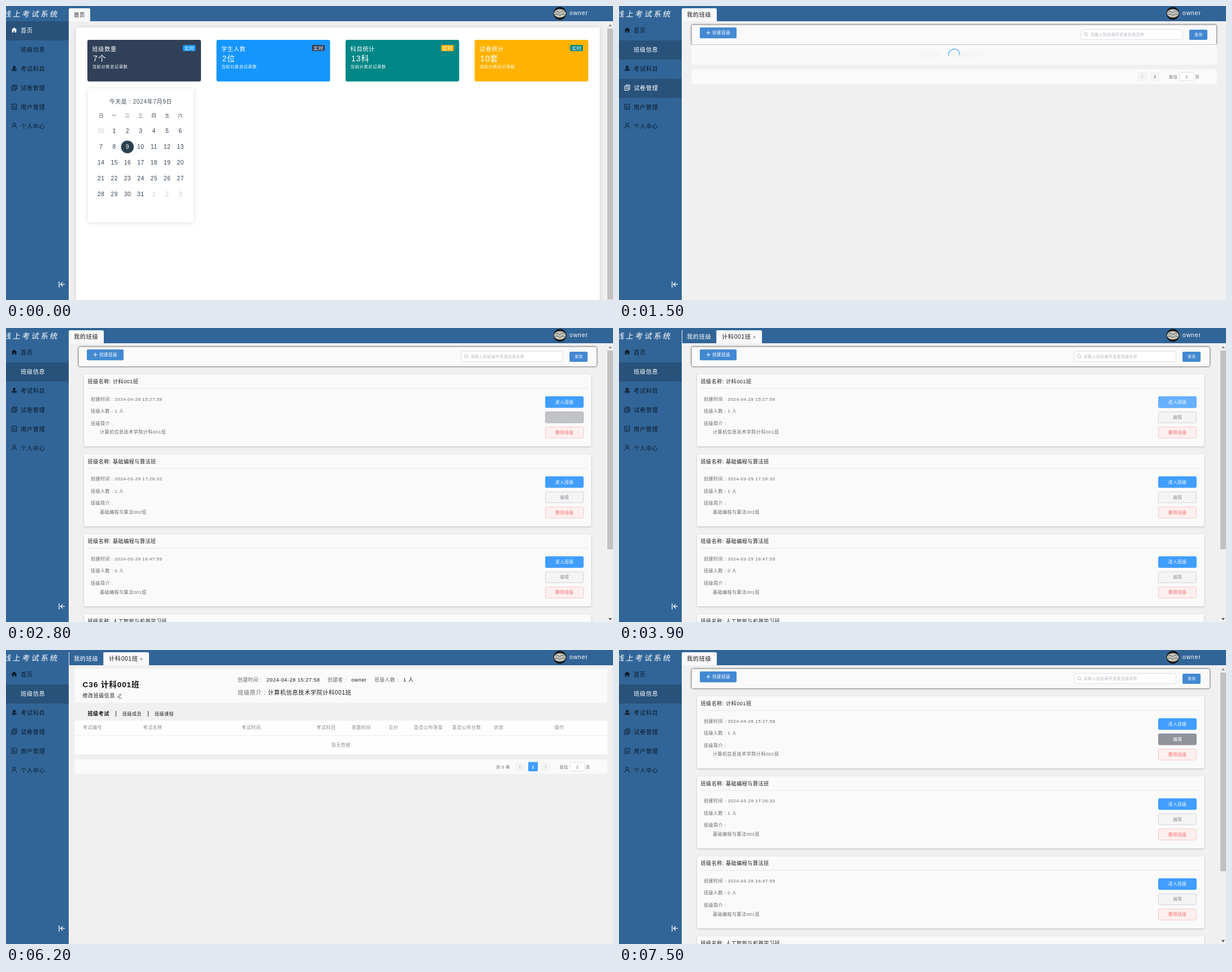
Write an HTML page that moves like this. It is 1074 px wide and 521 px high and loops after 8 s.

```html
<!DOCTYPE html>
<html lang="zh-CN">
<head>
<meta charset="utf-8">
<title>线上考试系统</title>
<style>
html, body { margin: 0; width: 100%; height: 100%; overflow: hidden; background: #f0f0f0; }
svg { display: block; width: 100vw; height: 100vh; }
text { font-family: "Liberation Sans", "Noto Sans CJK SC", "Noto Sans CJK", sans-serif; letter-spacing: .065em; white-space: pre; }
.item { color: #0b1a2a; }
.item > rect { fill: none; }
.item.on { color: #fff; }
.item.on > rect { fill: #29527b; }
.line { fill: none; stroke: currentColor; }
.bar { filter: drop-shadow(0 0 1.5px #000); }
.card { filter: drop-shadow(0 1px 1.5px rgba(0,0,0,.22)); }
.panel { filter: drop-shadow(0 1px 4px rgba(0,0,0,.13)); }
</style>
</head>
<body>
<svg id="stage" viewBox="0 0 1074 521"></svg>
<script>
const BLUE = '#409eff', BTN = '#4389d2', INK = '#1a1a1a', GREY = '#666', SIDE = '#316598';

// y is the vertical centre of the text
const text = (x, y, s, size, fill = INK, more = '') =>
  `<text x="${x}" y="${y + size * .37}" font-size="${size}" fill="${fill}" ${more}>${s}</text>`;
const mid = (x, y, s, size, fill, more = '') =>
  text(x + size * .03, y, s, size, fill, 'text-anchor="middle" ' + more);
const box = (x, y, w, h, fill, r = 0, more = '') =>
  `<rect x="${x}" y="${y}" width="${w}" height="${h}" rx="${r}" fill="${fill}" ${more}/>`;
const line = (d, color, w = 1) => `<path d="${d}" fill="none" stroke="${color}" stroke-width="${w}"/>`;
const group = (id, body, more = '') => `<g id="${id}" ${more}>${body}</g>`;
const button = (y, s, fill, color, border = fill) =>
  box(954.5, y + .5, 67, 19.5, fill, 2, `stroke="${border}"`) + mid(988, y + 10, s, 7.6, color, 'font-weight="500"');
const scrollbar = h => box(1064, 40, 10, h, '#c1c1c1') + '<path d="M1066 36h6l-3-4z" fill="#8a8a8a"/>';
const spinner = (id, y) =>
  `<circle id="${id}" cx="593" cy="${y}" r="9.8" fill="none" stroke="${BLUE}" stroke-width="1.2" stroke-dasharray="33 63" stroke-linecap="round"/>`;

function sidebar() {
  const icons = [
    '<path d="M14.5 38l-5 4.6h1.3V47h2.7v-3h2v3h2.7v-4.4h1.3z" fill="currentColor"/>',
    [0, 1, 2].map(r => [0, 1, 2].map(c => box(10 + c * 3.2, 72 + r * 3.2, 2.6, 2.6, 'currentColor')).join('')).join(''),
    '<path d="M14.5 106a2.4 2.4 0 0 1 1 4.6v1.2h3.3v2h-8.6v-2h3.3v-1.2a2.4 2.4 0 0 1 1-4.6zM10.2 114.4h8.6v.9h-8.6z" fill="currentColor"/>',
    '<path class="line" d="M12.5 142v-2h6.5v7.5h-2M10 142h6.8v7.5H10zM11.8 144.7h3.2M11.8 146.8h3.2"/>',
    '<path class="line" stroke-width=".9" d="M10.3 174h8.4v9.3h-8.4zM12.2 176.7h2M12.2 178.9h4.6M12.2 181h4.6"/>',
    '<path class="line" d="M14.5 207.4a2.6 2.6 0 1 1 0 5.2a2.6 2.6 0 1 1 0-5.2M10.3 217a4.2 4.2 0 0 1 8.4 0"/>'
  ];
  const names = ['首页', '班级信息', '考试科目', '试卷管理', '用户管理', '个人中心'];
  return box(0, 0, 111, 521, SIDE) +
    names.map((s, i) => `<g class="item">${box(0, 27 + 34 * i, 111, 34, '')}${icons[i]}${text(26, 43.3 + 33.9 * i, s, 10.2, 'currentColor')}</g>`).join('') +
    line('M94 488v11M104 493.3h-7.5M100.3 489.6l-3.8 3.7l3.8 3.7', '#fff', 1.3);
}

function header() {
  return box(0, 0, 1074, 27, SIDE) +
    text(0, 14, '线上考试系统', 13.4, '#fff', 'transform="translate(-2 0) skewX(-8)" style="letter-spacing:3px"') +
    '<circle cx="980" cy="13" r="11.4" fill="#181818"/><ellipse cx="980" cy="13" rx="10.5" ry="7.5" fill="#c6c6be"/>' +
    line('M972 11l4-2l3 3l5-3l4 2M971 15l5-1l4 3l4-3l5 1', '#555') +
    text(997, 12.6, 'owner', 10.4, '#fff', 'style="letter-spacing:.9px"');
}

const tabShape = (x, w, fill) =>
  `<path d="M${x} 27V6.500q0-2.500 2.500-2.500h${w - 5}q2.500 0 2.500 2.500V27z" fill="${fill}"/>`;

function tabs() {
  return group('homeTab', tabShape(111, 38, '#f9f9f9') + text(120, 16, '首页', 9.3)) +
    group('listTab', tabShape(111, 62, '#f9f9f9') + text(120, 15.6, '我的班级', 10.2)) +
    group('idleTab', tabShape(111, 62, '#f0f0f0') + tabShape(112, 60.5, SIDE) + text(120, 15.6, '我的班级', 10.2, '#fff')) +
    group('classTab', tabShape(172.5, 80.5, '#f9f9f9') + text(182, 15.6, '计科001班', 10.2) +
      '<circle id="closeDot" cx="239.500" cy="16.200" r="4.800" fill="#c0c4cc"/>' +
      '<path id="cross" d="M237.500 14.200l4 4m0-4l-4 4" stroke="#555" stroke-width=".9"/>');
}

function homePage() {
  const stats = [
    ['班级数量', '7个', '#304058', '#1596ff'], ['学生人数', '2位', '#1596ff', '#304058'],
    ['科目统计', '13科', '#018786', '#ffb300'], ['试卷统计', '10套', '#ffb300', '#018786']
  ];
  let s = box(124, 38, 926.5, 500, '#fff', 2, 'class="panel"');
  stats.forEach(([name, count, color, tag], i) => {
    const x = 144 + 228.4 * i;
    s += box(x, 60, 201, 73.7, color, 3) + text(x + 8.5, 76, name, 10.2, '#fff') +
      text(x + 10, 93, count, 14, '#fff') + text(x + 8.5, 107, '当前分类总记录数', 7.4, '#fff') +
      box(x + 169, 69, 22.5, 11, tag, 2) + mid(x + 180.3, 74.6, '实时', 8.3, '#fff');
  });
  s += box(145, 146, 187, 237, '#fff', 2, 'class="panel"') +
    mid(238, 169.3, '今天是 : 2024年7月9日', 10, '#46505a');
  [...'日一二三四五六'].forEach((d, i) => s += mid(168 + 23.4 * i, 194, d, 8.2, '#444'));
  s += '<circle cx="214.800" cy="249.700" r="11.300" fill="#2b4150"/>';
  for (let i = 0; i < 35; i++) {
    const day = (i + 29) % 30 + 1, inMonth = i > 0 && i < 32;
    const label = i === 0 ? 30 : i > 31 ? i - 31 : i === 31 ? 31 : day - 0;
    s += mid(168 + 23.4 * (i % 7), 221.3 + 28.1 * Math.floor(i / 7), inMonth ? i : label, 10,
      i === 9 ? '#fff' : inMonth ? '#2c3e50' : '#c8c8c8');
  }
  return s + scrollbar(480);
}

function searchBar(right) {
  const x = right - 1045;
  return box(128.5, 33.5, right - 128.5, 34.5, '#fafafa', 3, 'class="bar"') +
    box(143, 38, 65, 19.3, BTN, 2) + line('M154.5 47.300h7M158 43.800v7', '#fff') +
    text(165, 47.5, '创建班级', 7.5, '#fff', 'font-weight="500"') +
    box(805.5 + x, 41.5, 180, 18, '#fff', 2, 'stroke="#dcdfe6"') +
    `<circle cx="${814 + x}" cy="50" r="2.800" fill="none" stroke="#b4b8c0" stroke-width=".9"/>` +
    line(`M${816 + x} 52l1.500 1.500`, '#b4b8c0', .9) +
    text(822 + x, 50.5, '请输入班级编号或者班级名称', 6.9, '#b4b8c0') +
    box(997 + x, 42, 32, 18, BTN, 2) + mid(1013 + x, 51, '查询', 6.6, '#fff', 'font-weight="500"');
}

const pageButton = (x, y, dir, color) => box(x, y - 8.3, 17, 16.5, '#f4f4f5', 1) +
  line(`M${x + 8.5 - dir * 1.3} ${y - 2.8}l${dir * 2.7} 2.800l${-dir * 2.7} 2.800`, color);
const jumper = (x, y) => text(x, y + .5, '前往', 7.2, '#606266') +
  box(x + 18.5, y - 7.5, 25.5, 15, '#fff', 2, 'stroke="#dcdfe6"') +
  mid(x + 31.3, y, '1', 7.6, '#606266') + text(x + 46.5, y + .5, '页', 7.2, '#606266');

function listPage() {
  const classes = [
    ['计科001班', '2024-04-28 15:27:58', 1, '计算机信息技术学院计科001班'],
    ['基础编程与算法班', '2024-03-29 17:26:32', 1, '基础编程与算法002班'],
    ['基础编程与算法班', '2024-03-29 16:47:59', 0, '基础编程与算法001班'],
    ['人工智能与机器学习班', '', 0, '']
  ];
  const cards = classes.map(([name, time, count, about], i) =>
    `<g transform="translate(0 ${141.75 * i})">` +
    box(138, 82, 897.5, 127.7, '#fafafa', 2, 'class="card"') +
    text(144.5, 94.6, '班级名称: ' + name, 9) + line('M144.500 107h884', '#e6e6e6') +
    text(150, 125.6, '创建时间 : ' + time, 8, GREY) + text(150, 147, `班级人数 : ${count} 人`, 8, GREY) +
    text(150, 168.7, '班级简介 :', 8, GREY) + text(166, 184.5, about, 8, GREY) +
    button(121, '进入班级', BLUE, '#fff') + button(148, '编辑', '#f4f4f5', '#909399', '#d3d4d6') +
    button(175, '删除班级', '#fef0f0', '#f56c6c', '#fbc4c4') + '</g>').join('');
  const empty = searchBar(1057) + box(128.5, 68.5, 929, 35.5, '#f9f9f9') +
    mid(593, 86, '暂无班级，快去创建班级吧~~', 9, '#eee') + spinner('listSpin', 86) +
    box(128.5, 112, 929, 26, '#fafafa') + pageButton(917.5, 125.2, -1, '#b4b8c0') +
    pageButton(939.5, 125.2, 1, '#303133') + jumper(973, 125);
  const full = searchBar(1045) + cards +
    group('enterHover', button(121, '进入班级', '#66b1ff', '#fff')) +
    group('editHover', button(148, '编辑', '#909399', '#fff')) +
    scrollbar(352) + '<path d="M1066 514h6l-3 4z" fill="#555"/>';
  return group('empty', empty) + group('full', full);
}

function detailPage() {
  const columns = [[136, '考试编号'], [242.5, '考试名称'], [417, '考试时间'], [549.5, '考试科目'], [611.5, '答题时间'],
    [677, '总分'], [722, '是否公布答案'], [789.5, '是否公布分数'], [863.5, '状态'], [970.5, '操作']];
  const info = text(135.5, 60.5, 'C36 计科001班', 13.6, '#111', 'font-weight="bold"') +
    text(461, 53, '2024-04-28 15:27:58', 9) + text(611, 53, 'owner', 9) + text(703, 53, '1 人', 9) +
    text(463.5, 75, '计算机信息技术学院计科001班', 10.1);
  return box(122, 33, 942, 60.5, '#fafafa') + group('info', info) +
    text(135.5, 81, '修改班级信息', 9) +
    line('M198 84l.6-2.400l3.600-4l1.700 1.500l-3.600 4zM199.500 85.300h5', '#333', .8) +
    text(410, 53, '创建时间 :', 8.6, GREY) + text(569, 53, '创建者 :', 8.6, GREY) +
    text(652, 53, '班级人数 :', 8.6, GREY) + text(410, 75, '班级简介 :', 10, GREY) +
    text(144.5, 113, '班级考试', 9, '#111', 'font-weight="bold"') +
    line('M194.500 108v10M251.500 108v10', '#333') +
    text(206, 113, '班级成员', 8) + text(263, 113, '班级课程', 8) +
    box(122, 125, 942, 59.5, '#fefefe') + line('M122 151.500h942', '#ebeef5') +
    columns.map(([x, s]) => text(x, 137.5, s, 8, '#85888e')).join('') +
    mid(592.5, 168, '暂无数据', 8, '#909399') + box(122, 194, 942, 25.5, '#fafafa') +
    text(867, 206.8, '共 0 条', 7.3, '#606266') + pageButton(901, 207, -1, '#b4b8c0') +
    box(924, 198.5, 17, 16.5, BLUE, 1) + mid(932.5, 207, '1', 7.6, '#fff', 'font-weight="bold"') +
    pageButton(946, 207, 1, '#b4b8c0') + jumper(979.5, 207) +
    group('mask', box(122, 125, 942, 59.5, '#fff', 0, 'opacity=".9"') + spinner('detailSpin', 155));
}

const $ = id => document.getElementById(id);
$('stage').innerHTML = group('home', homePage()) + group('list', listPage()) + group('detail', detailPage()) +
  header() + sidebar() + text(0, 14, '线上考试系统', 13.4, '#fff', 'transform="translate(-2 0) skewX(-8)" style="letter-spacing:3px"') + tabs();
const items = document.querySelectorAll('.item');

const show = (id, v) => {
  $(id).setAttribute('opacity', v);
  $(id).style.display = v > 0 ? '' : 'none';
};

function draw(t) {
  const within = (a, b) => t >= a && t < b;
  const ramp = (a, b) => {
    const p = Math.min(1, Math.max(0, (t - a) / (b - a)));
    return p * p * (3 - 2 * p);
  };
  const on = [
    t < 800 || within(5200, 5400), t >= 200, within(1300, 1500), within(1500, 2000)
  ];
  items.forEach((el, i) => el.classList.toggle('on', !!on[i]));

  show('home', 1 - ramp(900, 1200));
  show('list', t < 4500 ? ramp(1100, 1400) - ramp(3900, 4100) : ramp(7000, 7300));
  show('empty', 1 - ramp(1800, 2200));
  show('full', ramp(1800, 2200));
  show('detail', ramp(4000, 4300) - ramp(6800, 7100));
  show('info', +(t >= 4400));
  show('mask', 1 - ramp(4300, 4600));
  for (const [id, y] of [['listSpin', 86], ['detailSpin', 155]])
    $(id).setAttribute('transform', `rotate(${170 + (t - 1500) * .25} 593 ${y})`);

  const mine = ramp(900, 1200), opened = within(3500, 6500);
  show('homeTab', 1 - mine);
  show('listTab', mine);
  show('idleTab', +opened);
  show('classTab', ramp(3400, 3800) - ramp(6400, 6800));
  show('closeDot', +(t >= 6300));
  $('cross').setAttribute('stroke', t >= 6300 ? '#fff' : '#555');

  const passing = within(2800, 3100) ? 1 - Math.abs(t - 2900) / 200 : 0;
  show('editHover', t >= 7500 ? 1 : passing);
  show('enterHover', t < 4500 ? ramp(2900, 3100) : 0);
}

const start = performance.now();
function tick() {
  draw(Math.floor((performance.now() - start) % 8000 / 100) * 100);
  requestAnimationFrame(tick);
}
tick();
</script>
</body>
</html>
```
